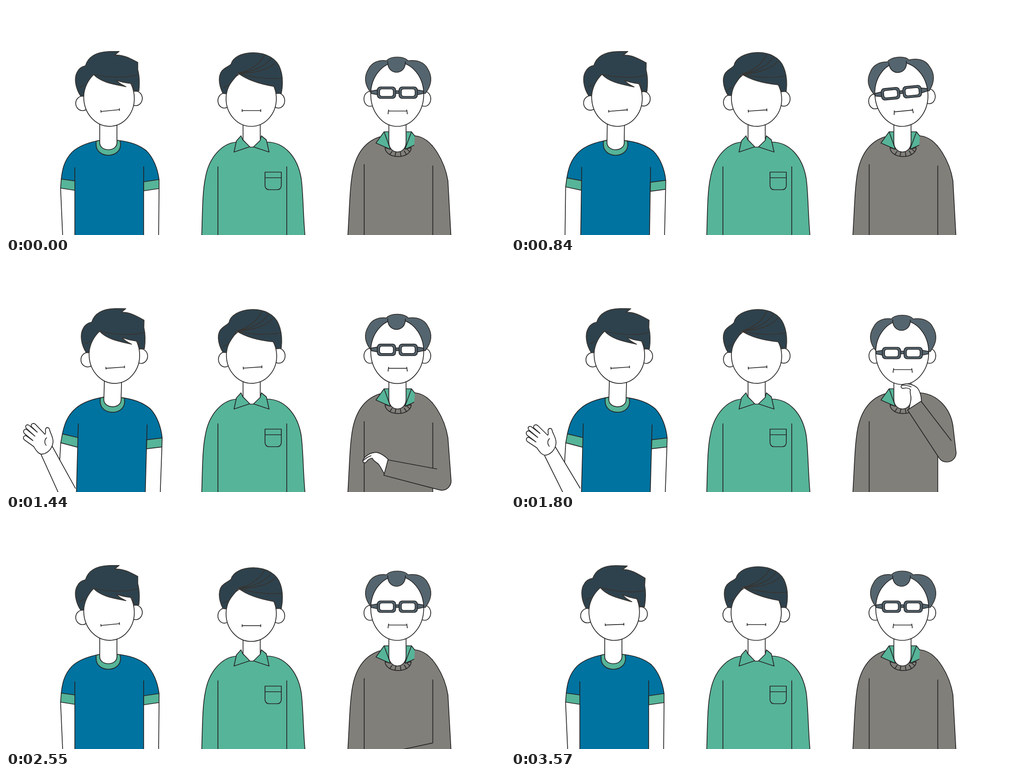
An HTML page with a canvas that plays this animation: 1102x508 px, repeating every 3600 ms.

```html
<!DOCTYPE html>
<html lang="en">
<head>
<meta charset="utf-8">
<title>Three men</title>
<style>
html, body { margin: 0; width: 100%; height: 100%; overflow: hidden; background: #fff; }
canvas { display: block; }
</style>
</head>
<body>
<canvas id="stage" width="1102" height="508"></canvas>
<script>
const ctx = document.getElementById('stage').getContext('2d');
const LOOP = 3600, STEP = 30, RAD = Math.PI / 180;
const INK = '#262425', WHITE = '#fff', BLUE = '#0073a0', GREEN = '#56b498',
      GREY = '#817f7a', HAIR = '#2e424d', OLD_HAIR = '#54656f', STRAND = '#37332f';

const smooth = x => x * x * (3 - 2 * x);
const linear = x => x;

// Value at time t from a flat list: time, value, time, value ...
function key(t, k, ease = smooth) {
  if (t <= k[0]) return k[1];
  for (let i = 2; i < k.length; i += 2) {
    if (t < k[i]) {
      const x = (t - k[i - 2]) / (k[i] - k[i - 2]);
      return k[i - 1] + (k[i + 1] - k[i - 1]) * ease(x);
    }
  }
  return k[k.length - 1];
}

function shape(d, fill, stroke = INK) {
  const p = new Path2D(d);
  if (fill) { ctx.fillStyle = fill; ctx.fill(p); }
  if (stroke) { ctx.strokeStyle = stroke; ctx.stroke(p); }
}
const line = (d, color = INK) => shape(d, null, color);

function oval(x, y, rx, ry, deg = 0) {
  ctx.beginPath();
  ctx.ellipse(x, y, rx, ry, deg * RAD, 0, 7);
  ctx.fillStyle = WHITE;
  ctx.fill();
  ctx.strokeStyle = INK;
  ctx.stroke();
}

function box(x, y, w, h, r, fill) {
  ctx.beginPath();
  ctx.roundRect(x, y, w, h, r);
  ctx.fillStyle = fill;
  ctx.fill();
  ctx.strokeStyle = INK;
  ctx.stroke();
}

function turned(x, y, deg, draw) {
  ctx.save();
  ctx.translate(x, y);
  ctx.rotate(deg * RAD);
  ctx.translate(-x, -y);
  draw();
  ctx.restore();
}

/* Young man */

function youngHead() {
  oval(169, 216, 15, 16);
  oval(286.5, 205, 14.5, 16);
  oval(227.5, 203.5, 55.8, 63.5, -5);
  shape('M165 200C153 182 150 160 157 147C161 138 168 134 175.5 132.500C181 113 198 102.500 226 101' +
    'C235 100.500 243 100.800 250 100.500L240 109C258 107.500 272 115 291 125L291 141C296 160 295 175 293.500 188.500' +
    'L283 188L278 172C268 171 256 170 244 164.500C249 172 257 175 265 179C240 174 210 170 193.500 152' +
    'C180 166 173 181 171.500 200Z', HAIR, STRAND);
  line('M193.500 152C220 158 262 161 291 152.500M163 181L173 175', STRAND);
  line('M209.700 234L250.500 230M209.400 231L210 236.500M250.200 227L250.800 232.500');
}

function wavingArm(k, wave) {
  const s = Math.sin(Math.PI * (1 - k)), cut = 0.45 * s;
  ctx.save();
  ctx.translate(141 + 50 * s, 518 + 18 * s);
  ctx.rotate((146 * (k - 1) + wave) * RAD);
  ctx.translate(-141, -518);
  const ex = 153 - 55 * cut, ey = 500 - 92 * cut;
  shape(`M98 408L${ex} ${ey}L120 520L74 427Z`, WHITE, null);
  line(`M98 408L${ex} ${ey}M74 427L120 520`);
  shape('M74 426.500C66 424 62 417 57 410L36 396C31 391 36 384 41 387.500L55 397' +
    'L35.500 382C31 376 36 370 41.500 373.500L59 387L39.500 370.500C35 364 41 360.500 46 364L64 378' +
    'L50.500 366C48 359.500 55 357 59.500 361L81 382C84 380 81 375 82 370.500C84 365 90 366 91 372' +
    'C93 380 100 388 99.500 399C98 416 86 426 74 426.500Z', WHITE);
  line('M85.500 389C80 394 80 402 85 407');
  ctx.restore();
}

function youngMan(t) {
  const k = key(t, [600, 0, 1050, 1, 2025, 1, 2475, 0]);
  const wave = key(t, [1110, 0, 1260, 20, 1410, 0, 1560, 20, 1710, 0]);
  const tilt = key(t, [2550, 0, 2880, 10, 3360, 10, 3690, 0], linear);
  const lean = draw => turned(228, 640, 1.55 * k, draw);

  lean(() => turned(146, 324, 4.4 * k, () => {
    line('M120.500 404L126.500 540');
    shape('M146 324C127 344 124 366 122 384L162 389.300V324Z', BLUE, null);
    line('M146 324C127 344 124 366 122 384');
    shape('M122 384L162 389.300V410.500L120.500 404Z', GREEN);
  }));
  if (k > 0) wavingArm(k, wave);
  lean(() => {
    line('M338 405L336.800 540');
    shape('M207 298C180 303 159 312 146 324L152 358V540H304V390L338 385C335 360 325 336 310 321' +
      'C294 308 270 300 245 298Z', BLUE, null);
    line('M207 298C180 303 159 312 146 324M338 385C335 360 325 336 310 321C294 308 270 300 245 298');
    shape('M304 390L338 385V405L304 410Z', GREEN);
    line('M152 358V540M304 356V540');
    shape('M207 298L199 300V307C199 339 253 339 253 307L252 299L245 298Z', GREEN);
    shape('M207 255V303C207 324 245 324 245 303V255', WHITE);
    turned(228, 210, tilt, youngHead);
  });
}

/* Middle man */

function middleHead() {
  oval(482, 210, 14, 16.5);
  oval(601.500, 210, 14, 16.5);
  oval(541.500, 205.5, 55.5, 61.5);
  shape('M479 194C468 172 468 149 481 140C487 135 492 134 497 129C501 113 522 103.500 546 103.500' +
    'C576 103.500 599 118 606 140C611 154 611 170 610 181L608 194L597 194L592 178.500C560 173 531 163 513 149' +
    'C506 161 490 172 487 195Z', HAIR, STRAND);
  line('M513 149C537 144 560 130 571 109M513 149C545 146 573 134 585 116M513 149C550 150 580 141 594 126' +
    'M513 149C540 158 575 163 609 160M479 182L490 176', STRAND);
  line('M521.500 232H562.500M521.500 229V235M562.500 229V235');
}

function middleMan(t) {
  const tilt = key(t, [570, 0, 780, -4, 1860, -4, 2070, 0], linear);
  const nod = key(t, [2370, 0, 2490, 2.4, 2610, 2.4, 2730, 0]);

  shape('M432 520L432.500 500C434 455 434 412 440 383C448 334 478 305 508 302H577' +
    'C614 302 644 334 652 383C656 412 656 455 659.500 500L661 520', GREEN);
  line('M468 356V508M620 356V508');
  line('M572 368.500H608V398C608 403 605 407.500 599 407.500H581C575 407.500 572 403 572 398ZM572 381H608');
  shape('M519 288L509 299L503.500 324L539 312L523 297Z', GREEN);
  shape('M564 288L575 297L581 324L545 312L561 298Z', GREEN);
  shape('M523.500 255V297L539 313H546L561.500 298V255', WHITE);
  ctx.save();
  ctx.translate(0, nod);
  turned(541, 195, tilt, middleHead);
  ctx.restore();
}

/* Older man */

function glasses() {
  shape('M806 188.500L821 186V197L806 194ZM922 188.500L908 186V197L922 194ZM859 188H869V194H859Z', OLD_HAIR);
  for (const x of [820, 868]) {
    box(x, 179.500, 40.5, 25.5, 7, OLD_HAIR);
    box(x + 5, 184, 30.5, 16.5, 5, WHITE);
  }
}

function olderHead(drop, slide) {
  oval(804, 206 - drop, 13.5, 16.5);
  oval(924.500, 206 - drop, 13.5, 16.5);
  shape('M807 194C793 177 789 158 801 139C808 125 824 119 840 121.500C849 110.500 879 110.500 888 121.500' +
    'C908 119 924 125 931 139C943 158 939 177 926 194Z', OLD_HAIR, STRAND);
  oval(864, 196, 58.5, 71);
  shape('M843 125V119H882V125C882 154.500 843 154.500 843 125Z', OLD_HAIR, null);
  line('M843 123V126C844 154 881 154 882 126V123');
  ctx.save();
  ctx.translate(0, slide);
  glasses();
  ctx.restore();
  ctx.translate(0, drop * 0.4);
  line('M844.500 233H885.500M845 230L843.700 240M885 230L886.300 240');
}

function chinHand() {
  shape('M906 312C907 294 901 278 893 274C885 268 869 266 862.500 271C859.500 275 862 279 867 278' +
    'C873 276.500 879 278 882 281C879 287 884 295 883 302C882 310 880 316 878 326Z', WHITE);
  line('M862.500 271C869 271 878 272 884 275');
}

function glassesHand() {
  shape('M933 256C933 244 934 232 937 216C938 204 930 194 922 192.500C918 194 921 198 919 198' +
    'C913 195 906 192 901 196.500C899 200 904 202 908 202L915 208C912 217 908 234 910 242L912 260Z', WHITE);
  line('M919 198C925 201 929 206 931 212M908 202C914 202 918 205 921 209');
}

function upperArm(ex, ey, r, end) {
  const top = Math.max(352, Math.min(388, ey - 60));
  const arm = new Path2D();
  arm.moveTo(903, 288);
  arm.bezierCurveTo(943, 291, 970, top - 38, 976, top);
  arm.lineTo(983, Math.min(ey, 518));
  arm.arc(ex, ey, r, 0, end);

  const area = new Path2D(arm);
  area.lineTo(942, ey);
  area.lineTo(900, 330);
  ctx.fillStyle = GREY;
  ctx.fill(area);
  ctx.strokeStyle = INK;
  ctx.stroke(arm);
}

function olderArm(t) {
  const ex = 962.5, r = 20.5;
  const ey = key(t, [1110, 640, 1620, 421, 1830, 421, 2070, 390, 2370, 390, 2730, 640]);
  const turn = key(t, [1110, 90, 1620, 237, 1830, 237, 2070, 254, 2370, 254, 2730, 90]);
  const reach = key(t, [1830, 127, 2070, 141, 2370, 141, 2730, 127]);

  upperArm(ex, ey, r, (turn - 90) * RAD);
  line('M942.500 354V508');
  if (ey > 600) return;

  ctx.save();
  ctx.translate(ex, ey);
  ctx.rotate(turn * RAD);
  ctx.save();
  ctx.translate(reach, 0);
  if (t > 1920) {
    ctx.rotate(-254 * RAD);
    ctx.translate(-924, -254.5);
    glassesHand();
  } else {
    ctx.rotate(-237 * RAD);
    ctx.translate(-893, -314.5);
    chinHand();
  }
  ctx.restore();
  shape(`M0 -${r}L${reach} -21L${reach} 14.500L17 23L0 18Z`, GREY, null);
  line(`M0 -${r}L${reach} -21L${reach} 14.500L17 23`);
  ctx.restore();
}

function collar() {
  shape('M846 279H835L817 304L849 318Z', GREEN);
  shape('M883 279H895.500L914 303L881 318Z', GREEN);
  line('M835 279L849 318M895.500 279L881 318');
  shape('M837 314C838 340.500 894 340.500 895 314L880 318H850Z', GREY, null);
  line('M837 314C838 340.500 894 340.500 895 314M837 314L849 318M895 314L881 318' +
    'M853 322L848 329M861 324L859 333M871 324L872 333M879 321L884 329M885 317L891 323');
  shape('M845.500 255V302C845.500 331 883.500 331 883.500 302V255', WHITE);
}

function olderMan(t) {
  const tilt = key(t, [570, 0, 810, -5.5, 1200, -5.5, 1440, 0], linear);
  const drop = key(t, [1400, 0, 1560, 2.5, 1950, 2.5, 2070, 3.5, 2350, 3.5, 2520, 0]);
  const slide = key(t, [1500, 0, 1620, 5, 1950, 5, 2070, 1, 2400, 1, 2520, 0]);
  const left = 'M754.500 520L755.500 500C759 440 759 415 763 385C768 340 785 303 826 290';

  shape(left + 'L903 288L942.500 309V520Z', GREY, null);
  line(left + 'M791 351V508M895 287L904 288');
  collar();
  ctx.save();
  ctx.translate(0, drop);
  turned(864, 215, tilt, () => olderHead(drop, slide));
  ctx.restore();
  olderArm(t);
}

function frame(now) {
  const t = Math.floor((now % LOOP) / STEP) * STEP;
  ctx.fillStyle = WHITE;
  ctx.fillRect(0, 0, 1102, 508);
  ctx.save();
  ctx.beginPath();
  ctx.rect(0, 100, 1102, 408);
  ctx.clip();
  ctx.lineWidth = 1.7;
  ctx.lineJoin = 'round';
  youngMan(t);
  middleMan(t);
  olderMan(t);
  ctx.restore();
}

let start;
function tick(now) {
  start ??= now;
  frame(Math.max(0, now - start));
  requestAnimationFrame(tick);
}
frame(0);
requestAnimationFrame(tick);
</script>
</body>
</html>
```
